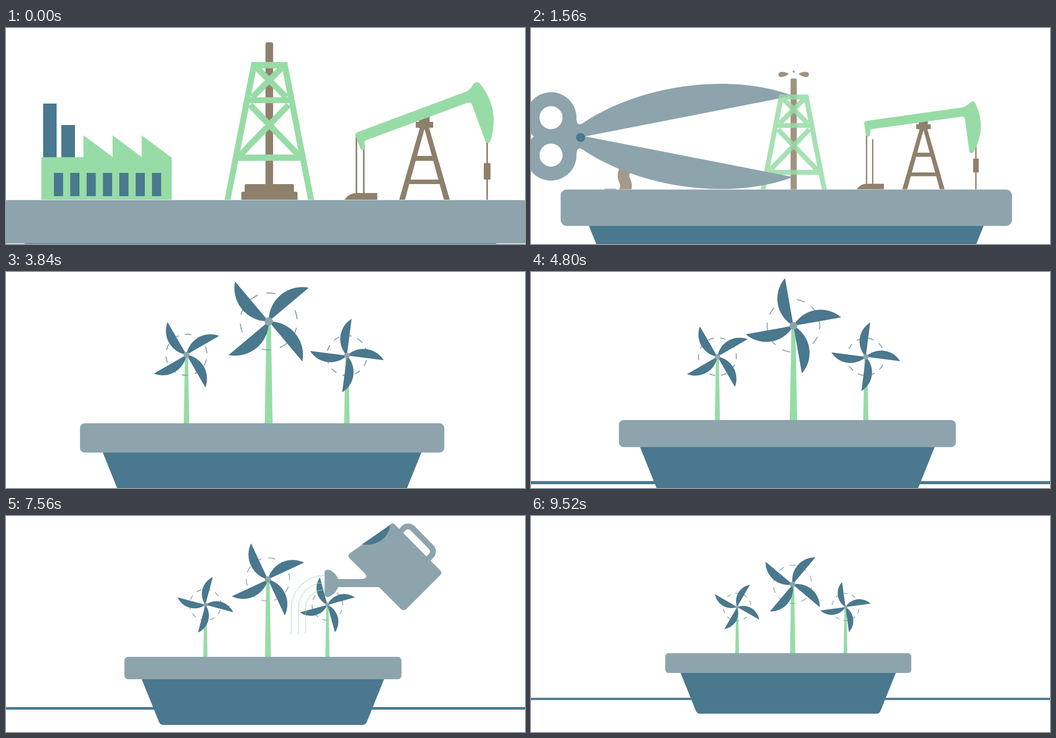
Recreate the animation shown at these times as an HTML page with a canvas. Size 1159x483 px, loop 9.56 s.

```html
<!DOCTYPE html>
<html lang="en">
<head>
<meta charset="utf-8">
<title>From oil to wind</title>
<style>
  html, body { margin: 0; width: 100%; height: 100%; overflow: hidden; background: #fff; }
  canvas { display: block; }
</style>
</head>
<body>
<canvas id="stage" width="1159" height="483"></canvas>
<script>
const ctx = document.getElementById('stage').getContext('2d');
const W = 1159, H = 483, CX = W / 2, CY = H / 2;
const LOOP = 9560, STEP = 40, END = 9.52;
const NEAR = 2.193, POUR = 1.1265;   // zoom levels in which parts are laid out
const GREY = '#8da4ad', BLUE = '#4a788e', GREEN = '#97dca6', BROWN = '#8f806c';
const RAD = Math.PI / 180, TAU = Math.PI * 2;
let t = 0, zoom = 1;

const clamp = v => Math.max(0, Math.min(1, v));
const easeOut = v => 1 - (1 - v) ** 3;

// Coordinates after this call are stage pixels as seen at zoom k.
function view(k) {
  const m = zoom / k;
  ctx.setTransform(m, 0, 0, m, CX * (1 - m), CY * (1 - m));
}

function group(fn) {
  ctx.save();
  fn();
  ctx.restore();
}

function fill(color, build) {
  ctx.fillStyle = color;
  ctx.beginPath();
  build();
  ctx.fill();
}

function line(color, width, build) {
  ctx.strokeStyle = color;
  ctx.lineWidth = width;
  ctx.beginPath();
  build();
  ctx.stroke();
}

const rect = (c, x1, y1, x2, y2, r = 0) =>
  fill(c, () => ctx.roundRect(x1, y1, x2 - x1, y2 - y1, r));
const disc = (c, x, y, r) => fill(c, () => ctx.arc(x, y, r, 0, TAU));

function poly(...p) {
  ctx.moveTo(p[0], p[1]);
  for (let i = 2; i < p.length; i += 2) ctx.lineTo(p[i], p[i + 1]);
  ctx.closePath();
}

function bar(x1, y1, x2, y2, w) {
  const d = Math.hypot(x2 - x1, y2 - y1), k = w / 2 / d;
  const nx = -(y2 - y1) * k, ny = (x2 - x1) * k;
  poly(x1 + nx, y1 + ny, x2 + nx, y2 + ny, x2 - nx, y2 - ny, x1 - nx, y1 - ny);
}

// Objects drop into the pot once the blades reach them.
function sink(start, x, shrink, draw) {
  const p = clamp((t - start) / 0.8);
  if (p >= 1) return;
  group(() => {
    ctx.beginPath();
    ctx.rect(-2000, -2000, 6000, 2384);
    ctx.clip();
    const k = 1 - shrink * p;
    ctx.translate(x, 384 + 305 * p);
    ctx.scale(k, k);
    ctx.translate(-x, -384);
    ctx.globalAlpha = Math.max(0.8, 1 - p);
    draw();
  });
}

function factory() {
  const h = 165 * easeOut(clamp((t - 0.08) / 0.7));
  if (h > 0) line(BROWN, 31, () => {
    for (let y = 0; y <= h; y += 3) {
      ctx.lineTo(137 + 3.5 * Math.sin(y * TAU / 56 + t * 5), 218 - y);
    }
  });
  rect(BLUE, 83, 169, 113, 290);
  rect(BLUE, 123.5, 217, 154, 290);
  fill(GREEN, () => {
    ctx.rect(79, 289, 291, 95);
    for (let i = 0; i < 3; i++) {
      const x = 173 + 65 * i;
      poly(x, 240, x + 67, 290, x, 290);
    }
  });
  for (let i = 0; i < 7; i++) {
    const x = 107 + 36.5 * i;
    rect(BLUE, x, 324, x + 20.5, 376);
  }
}

function spray() {
  const age = (t - 0.16) / 0.4;
  if (age < 0) return;
  const u = age % 1, size = Math.sin(Math.PI * u);
  for (const side of [-1, 1]) group(() => {
    ctx.translate(588 + side * (6 + 14 * u), 32 - 46 * u * (1 - u));
    ctx.scale(side * size * 1.07, size * 1.25);
    ctx.rotate((u - 0.5) * 1.2);
    fill(BROWN, () => {
      ctx.moveTo(0, -1);
      ctx.quadraticCurveTo(12, -7, 22, -5);
      ctx.bezierCurveTo(29, -3, 29, 6, 20, 6);
      ctx.quadraticCurveTo(10, 6, 0, -1);
    });
  });
  disc(BROWN, 588, 32 - 38 * u, 2.8 * size);
}

function derrick() {
  spray();
  fill(BROWN, () => {
    ctx.roundRect(579.5, 32, 17, 320, 4);
    ctx.roundRect(533, 349, 110, 22, 4);
    ctx.roundRect(525.5, 366, 125.5, 22, 4);
  });
  fill(GREEN, () => {
    poly(488, 384, 501.5, 384, 562, 76, 548, 76);
    poly(674.5, 384, 688, 384, 628, 76, 614, 76);
    bar(549, 83, 627, 83, 14);
    bar(540, 161.5, 636, 161.5, 13);
    bar(515, 290, 661, 290, 14);
    for (const s of [-1, 1]) {
      bar(588 - 27 * s, 90, 588 + 38 * s, 155, 13.5);
      bar(588 - 43 * s, 172, 588 + 66 * s, 285, 13.5);
    }
  });
}

function pump() {
  const swing = 15.7 * (1 - Math.cos(t * TAU / 2.4)) / 2;
  fill(BROWN, () => {
    poly(878, 384, 891, 384, 935.5, 222, 924.5, 222);
    poly(978, 384, 991, 384, 944.5, 222, 933.5, 222);
    bar(907, 291.5, 962, 291.5, 11);
    bar(892, 344, 977, 344, 10);
    bar(915, 216.5, 954, 216.5, 13);
    bar(922, 211, 946, 211, 26);
    bar(782.5, 240, 782.5, 371, 3.5);
    bar(799, 270 - 1.6 * swing, 799, 371, 3.5);
    bar(1074.5, 225, 1074.5, 384, 3.5);
  });
  rect(BROWN, 1067, 302, 1082, 339, 2);
  fill(BROWN, () => {
    ctx.moveTo(756, 384);
    ctx.quadraticCurveTo(766, 369, 784, 369);
    ctx.lineTo(829, 369);
    ctx.lineTo(829, 384);
  });
  group(() => {
    ctx.translate(929, 205);
    ctx.rotate(swing * RAD);
    ctx.translate(-929, -205);
    fill(GREEN, () => {
      ctx.moveTo(780, 240);
      ctx.quadraticCurveTo(780, 235, 785, 233);
      ctx.lineTo(1028, 142);
      ctx.quadraticCurveTo(1036, 138, 1044, 126);
      ctx.quadraticCurveTo(1051, 117, 1058, 124);
      ctx.quadraticCurveTo(1086, 158, 1089, 200);
      ctx.quadraticCurveTo(1090, 228, 1082, 252);
      ctx.quadraticCurveTo(1076, 262, 1070, 252);
      ctx.lineTo(1041, 172);
      ctx.quadraticCurveTo(1038, 165, 1031, 167);
      ctx.lineTo(804, 251);
      ctx.quadraticCurveTo(799, 253, 801, 259);
      ctx.lineTo(802, 264);
      ctx.quadraticCurveTo(803, 272, 797, 273);
      ctx.quadraticCurveTo(792, 273, 790, 266);
    });
  });
}

// One blade with its ring; side 1 is the upper half, -1 the lower.
function scissorHalf(side) {
  const open = 5.9 + 5.25 * Math.cos((t - 1.5) * TAU / 1.07);
  group(() => {
    ctx.translate(CX - 255.5 + 400.6 * (t - 1.56), CY + 0.5);
    ctx.scale(1, side);
    ctx.rotate(-open * RAD);
    line(GREY, 17, () => ctx.arc(-31.1, -29.2, 22.5, 0, TAU));
    fill(GREY, () => {
      ctx.moveTo(-14, -26.5);
      ctx.lineTo(-1, -21);
      ctx.quadraticCurveTo(-2, -12, 6, -15.6);
      ctx.bezierCurveTo(80, -47, 190, -44.5, 263.5, 0);
      ctx.lineTo(0, 1);
      ctx.lineTo(-30, 2);
      ctx.lineTo(-25, -13);
    });
  });
  if (side < 0) disc(BLUE, CX - 255.5 + 400.6 * (t - 1.56), CY + 1.8, 5.5);
}

function pot() {
  rect(BLUE, -W, 406.5, 2 * W, 411.6);
  fill(BLUE, () => {
    ctx.moveTo(333.7, 350);
    ctx.arcTo(370.7, 442, 480, 442, 10);
    ctx.arcTo(778, 442, 815, 350, 10);
    ctx.lineTo(815, 350);
  });
  rect(GREY, 299.7, 306.8, 849.2, 351.1, 7.5);
}

function turbine(x, y, len, ring, base, speed, phase, start) {
  const g = easeOut(clamp((t - start) / 0.75));
  if (!g) return;
  const ground = 307.5;
  group(() => {
    ctx.translate(x, ground);
    ctx.scale(g, g);
    fill(GREEN, () => poly(-base * 0.27, y - ground, base * 0.27, y - ground, base / 2, 0, -base / 2, 0));
    ctx.translate(0, y - ground);
    group(() => {
      ctx.rotate((50 * (t - END) - 99) * RAD);
      const dash = ring * Math.PI / 10;
      ctx.setLineDash([dash, dash]);
      line(GREY, 1.6, () => ctx.arc(0, 0, ring, 0, TAU));
    });
    group(() => {
      ctx.rotate((phase + speed * (t - END)) * RAD);
      for (let i = 0; i < 4; i++) {
        fill(BLUE, () => ctx.arc(0.401 * len, -0.5 * len, 0.641 * len, Math.PI - 0.894, Math.PI + 0.894));
        ctx.rotate(Math.PI / 2);
      }
    });
    disc(GREY, 0, 0, len * 0.078);
  });
}

function water() {
  const head = clamp((t - 5.7) / 0.45), tail = clamp((t - 7.75) / 0.4);
  if (!head || tail >= 1) return;
  group(() => {
    ctx.globalAlpha = 0.6;
    for (const r of [74, 58, 42]) {
      const arc = r * Math.PI / 2, len = arc + 58;
      line(GREEN, 1.7, () => {
        for (let d = tail * len; d <= head * len; d += 2) {
          const a = Math.min(d / r, Math.PI / 2);
          const wave = 0.7 * Math.sin(d * 0.6 - t * 30);
          ctx.lineTo(711 - (r + wave) * Math.sin(a), 207 - (r + wave) * Math.cos(a) + Math.max(0, d - arc));
        }
      });
    }
  });
}

function can() {
  const away = 1 - easeOut(clamp((t - 4.9) / 0.75)) + clamp((t - 8.1) / 0.75) ** 2;
  if (away >= 1) return;
  group(() => {
    ctx.translate(300 * away, -270 * away);
    line(GREY, 13, () => {
      ctx.moveTo(878, 38);
      ctx.arcTo(898, 17, 959, 79, 14);
      ctx.arcTo(959, 79, 942, 97, 14);
      ctx.lineTo(942, 97);
    });
    fill(GREY, () => {
      ctx.moveTo(815, 51);
      ctx.arcTo(864, 14.5, 975, 127, 6);
      ctx.arcTo(975, 127, 888, 214, 6);
      ctx.arcTo(888, 214, 835, 159, 8);
      ctx.lineTo(833, 159);
      ctx.lineTo(738, 159);
      ctx.lineTo(738, 141);
      ctx.lineTo(796, 141);
      ctx.quadraticCurveTo(809, 138, 803, 130);
      ctx.arcTo(761, 88, 815, 51, 7);
    });
    fill(BLUE, () => {
      ctx.moveTo(795, 63.5);
      ctx.lineTo(858, 20);
      ctx.bezierCurveTo(855, 50, 828, 68, 795, 63.5);
    });
    fill(GREY, () => {
      ctx.moveTo(711.5, 126);
      ctx.quadraticCurveTo(712, 119, 720, 120);
      ctx.quadraticCurveTo(734, 124, 742, 141);
      ctx.lineTo(742, 159);
      ctx.quadraticCurveTo(734, 177, 720, 181);
      ctx.quadraticCurveTo(712, 182, 711.5, 174);
    });
  });
}

function draw(ms) {
  t = Math.floor((ms % LOOP) / STEP) * STEP / 1000;
  zoom = 1 / (0.456 + 0.05714 * t);
  ctx.setTransform(1, 0, 0, 1, 0, 0);
  ctx.fillStyle = '#fff';
  ctx.fillRect(0, 0, W, H);

  view(1);
  scissorHalf(1);
  view(NEAR);
  sink(1, 224, 0, factory);
  sink(1.44, 588, 0.19, derrick);
  sink(1.75, 925, 0.19, pump);
  view(1);
  turbine(460.3, 203.4, 57, 31, 8.4, 375, 30, 2.9);
  turbine(584.3, 153, 79, 43, 12, 125, 40, 3.1);
  turbine(702.3, 203.6, 56.5, 30.5, 8.4, 187.5, -7.7, 3.25);
  pot();
  scissorHalf(-1);
  view(POUR);
  water();
  can();
}

const begin = performance.now();
function tick() {
  draw(performance.now() - begin);
  requestAnimationFrame(tick);
}
tick();
</script>
</body>
</html>
```
